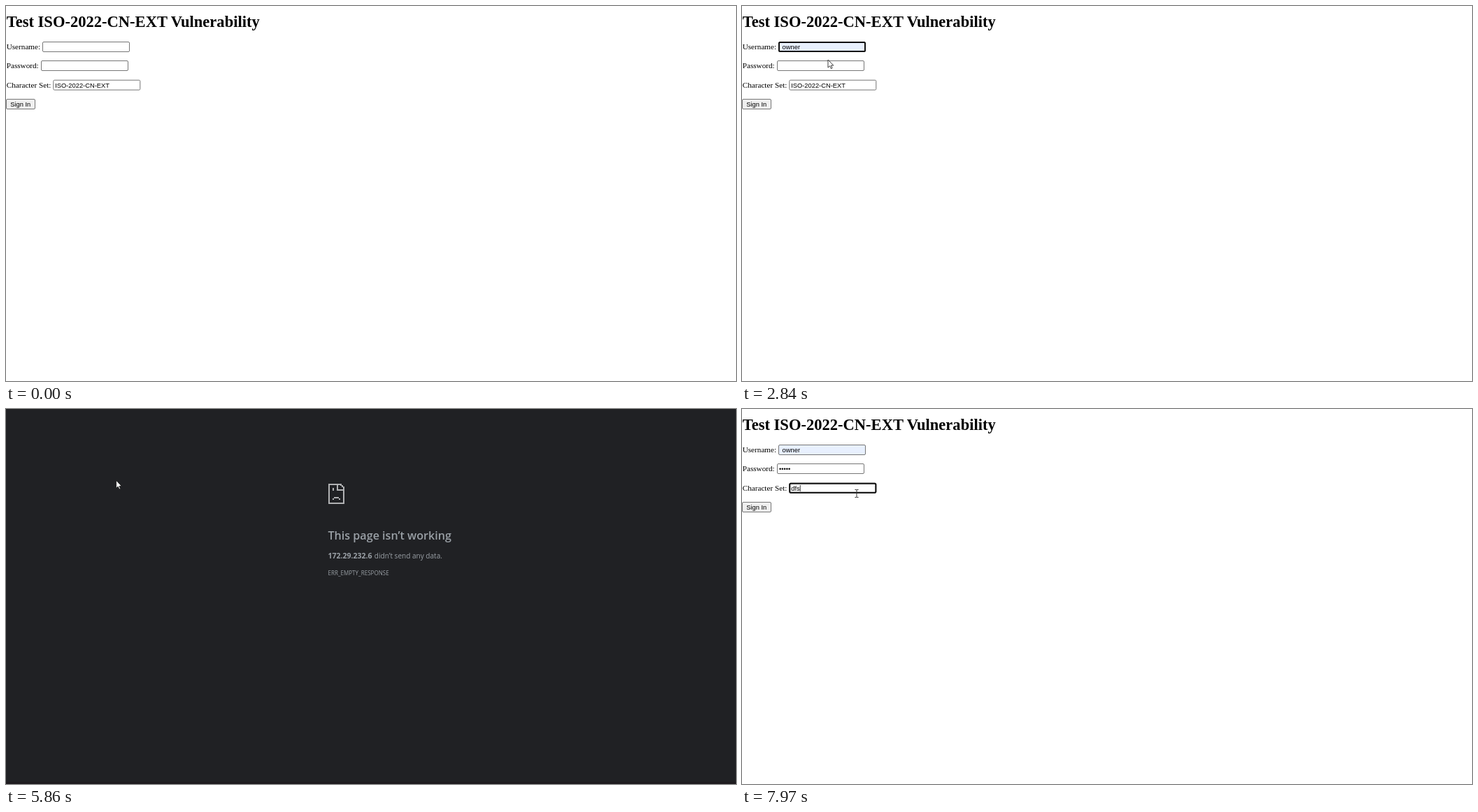
Recreate the animation shown at these times as an HTML page. Size 1044x537 px, loop 8000 ms.

```html
<!DOCTYPE html>
<html lang="en">
<head>
<meta charset="utf-8">
<title>Charset form</title>
<style>
html, body { margin: 0; width: 100%; height: 100%; overflow: hidden; background: #fff; }
svg { display: block; }
text { white-space: pre; }
#page { font: 11.2px "Liberation Serif", "Times New Roman", serif; }
.title { font-size: 22.56px; font-weight: 700; }
.ui { font: 9.33px "Liberation Sans", Arial, sans-serif; }
.field { width: 124px; height: 14px; rx: 1.5px; fill: #fff; stroke: #767676; }
#list, #error, #menu { font-family: "Open Sans", "Noto Sans", sans-serif; }
#list { font-size: 8.9px; font-weight: 600; fill: #fff; filter: drop-shadow(0 1px 1px #0004); }
#error { fill: #9aa0a6; }
#menu { font-size: 8.2px; fill: #e8eaed; }
#menu .box { filter: drop-shadow(0 3px 4px #0006); }
#menu .dim { fill: #9aa0a6; }
</style>
</head>
<body>
<svg width="1044" height="537" viewBox="0 0 1044 537">
  <g id="page">
    <text class="title" x="0.7" y="30">Test ISO-2022-CN-EXT Vulnerability</text>
    <text x="0.7" y="61.8">Username:</text>
    <text x="0.7" y="89.3">Password:</text>
    <text x="0.7" y="116.8">Character Set:</text>
    <rect class="field" x="52.5" y="51.5"/>
    <rect class="field" x="50.5" y="78.5"/>
    <rect class="field" x="67.8" y="106.2"/>
    <rect x="0.5" y="133.5" width="41" height="14" rx="1.5" fill="#efefef" stroke="#767676"/>
    <g class="ui">
      <text x="6.2" y="144">Sign In</text>
      <text id="user" x="55" y="61.5"> owner</text>
      <text id="pass" x="53" y="89"></text>
      <text id="charset" x="70.2" y="116.6"></text>
      <clipPath id="clip"><rect id="range" y="108" height="11"/></clipPath>
      <g id="selection" clip-path="url(#clip)" fill="#fff">
        <rect x="70" y="108" width="79" height="11" fill="#0078d7"/>
        <text x="70.2" y="116.6">ISO-2022-CN-EXT</text>
      </g>
    </g>
    <rect id="ring" width="123" height="13" rx="1.5" fill="none" stroke="#101010" stroke-width="2"/>
    <rect id="caret" width="0.8" height="9"/>
  </g>

  <g id="list">
    <path d="M109 72.5L115 66L121 72.5Z" fill="#28292d"/>
    <rect x="100" y="72" width="169.5" height="158" rx="2" fill="#28292d"/>
    <rect id="pick" x="100" y="75" width="169.5" height="25.4" fill="#3f4045"/>
  </g>

  <g id="error">
    <rect width="1044" height="537" fill="#202124"/>
    <rect y="534" width="1044" height="3" fill="#1e1b1f"/>
    <path fill="#b0b1b3" d="M461 107h19v2h2v2h2v25h-23zM463 109v25h19v-17h-9v-8zM475 109v6h7v-3h-2v-2h-2v-1zM467 113h2v4h-2zM469 126h7v2h-7zM467 128h2v2h-2zM476 128h2v2h-2z" fill-rule="evenodd"/>
    <text x="460.5" y="186.5" font-size="16.1" font-weight="600">This page isn’t working</text>
    <text x="460.5" y="213.8" font-size="10.5" font-weight="700">172.29.232.6</text>
    <text x="526.8" y="213.8" font-size="10.05">didn’t send any data.</text>
    <text x="460.5" y="238.3" font-size="8.05">ERR_EMPTY_RESPONSE</text>
  </g>

  <g id="menu">
    <rect class="box" x="234.5" y="125.5" width="242.5" height="179" rx="5" fill="#292a2d" stroke="#414246"/>
    <rect id="hover" x="237" y="128" width="238" height="17.5" rx="1" fill="#3f4042"/>
    <path d="M238 183.5H474M238 222.5H474M238 244.5H474M238 264.5H474" stroke="#3f4145"/>
    <path d="M249.5 232v-3h3M257 228.5h3v3M260 236v3h-3M252.5 239.5h-3v-3M252 231h2v2h-2zM256 231h2v2h-2zM252 235h2v2h-2zM256 235h2v2h-2z" fill="none" stroke="#b4b6b9" stroke-width="0.9"/>
    <circle cx="254.5" cy="255" r="5" fill="#e8552d"/>
    <path d="M464.5 252l4 3-4 3z" fill="#bdc1c6"/>
  </g>

  <circle id="click" r="9" fill="#eee600" fill-opacity="0.62"/>
  <path id="arrow" d="M0 0V11.2L2.6 8.8L4.4 12.7L6.1 11.9L4.4 8.1H7.8Z" fill="#fff" stroke="#111" stroke-width="0.8"/>
  <path id="beam" d="M-2.5 -5.5H-0.7L0 -5L0.7 -5.5H2.5M0 -5V5M-2.5 5.5H-0.7L0 5L0.7 5.5H2.5" fill="none" stroke="#333"/>
</svg>
<script>
const LOOP = 8000;
const $ = id => document.getElementById(id);
const show = (id, on) => { $(id).style.display = on ? '' : 'none'; };
const within = (t, a, b) => t >= a && t < b;
const moveTo = (id, x, y) => $(id).setAttribute('transform', `translate(${x} ${y})`);

function addText(parent, str, x, y, attrs = {}) {
  const el = document.createElementNS('http://www.w3.org/2000/svg', 'text');
  for (const [k, v] of Object.entries({ x, y, ...attrs })) el.setAttribute(k, v);
  el.textContent = str;
  $(parent).append(el);
}

['owner', 'owner%00', "<?php system($_GET['cmd']);?>", 'cedar456456', 'user', 'owner']
  .forEach((s, i) => addText('list', s, i ? 108.7 : 111, 91 + i * 25.4));

[['Back', 'Alt+Left Arrow', 140.5], ['Forward', 'Alt+Right Arrow', 158.8], ['Reload', 'Ctrl+R', 177],
 ['Save as...', 'Ctrl+S', 197.5], ['Print...', 'Ctrl+P', 215.8], ['Create QR Code for this page', '', 237],
 ['Zorel', '', 258], ['View page source', 'Ctrl+U', 278.6], ['Inspect', '', 297]]
  .forEach(([label, keys, y], i) => {
    addText('menu', label, 269, y, { class: i === 1 ? 'dim' : '' });
    addText('menu', keys, 452, y, { class: i ? 'dim' : '', 'text-anchor': 'end' });
  });

// Pointer: time, x, y
const path = [
  [130, 962, 506], [890, 125, 54], [1420, 125, 54], [1800, 122, 86], [2380, 122, 86], [2450, 123, 77],
  [2840, 123, 77], [2910, 118, 84], [3520, 118, 84], [3600, 51, 71], [5590, 51, 71], [6080, 235, 125],
  [6200, 235, 125], [6350, 255, 134], [6810, 255, 134], [6950, 205, 146], [7150, 150, 112],
  [7220, 150, 112], [7500, 50, 111], [7630, 50, 111], [7770, 164, 121], [LOOP, 164, 121]
];
const clicks = [[1010, 1160], [1990, 2120], [2980, 3120], [6080, 6210], [6480, 6610], [7200, 7630]];
const keyTimes = [3380, 3520, 4050, 4180, 4380];
const fields = [...document.querySelectorAll('.field')];
const spots = fields.map(f => [+f.getAttribute('x'), +f.getAttribute('y')]);

function pointerAt(t) {
  const i = path.findIndex(p => p[0] > t);
  if (i < 1) return path[0].slice(1);
  const [t0, x0, y0] = path[i - 1], [t1, x1, y1] = path[i];
  const u = (t - t0) / (t1 - t0), k = u * u * (3 - 2 * u);
  return [x0 + (x1 - x0) * k, y0 + (y1 - y0) * k];
}

function draw(t) {
  const [x, y] = pointerAt(t);
  const dark = within(t, 4730, 6610), listOpen = within(t, 1080, 2120);
  const over = dark || (listOpen && y > 66) ? -1
    : spots.findIndex(([fx, fy]) => x >= fx && x <= fx + 124 && y >= fy - 0.5 && y <= fy + 15);
  const focus = within(t, 1010, 2980) ? 0 : within(t, 2980, 4730) ? 1 : t >= 7200 ? 2 : -1;
  const filled = t >= 1700, dots = keyTimes.filter(k => t >= k).length;

  show('page', !dark);
  show('error', dark);
  show('list', listOpen);
  show('pick', listOpen && y > 75);
  show('menu', within(t, 6150, 6610));
  show('hover', t >= 6270);

  fields.forEach((f, i) => { f.style.stroke = i === over ? '#4f4f4f' : ''; });
  fields[0].style.fill = filled ? '#e8f0fe' : '';
  show('user', filled);
  $('pass').textContent = '•'.repeat(dots);
  $('charset').textContent = t >= 7970 ? 'dfs' : 'ISO-2022-CN-EXT';

  const selecting = within(t, 7220, 7970);
  const left = t < 7500 ? Math.min(149, Math.max(70, x)) : 70;
  show('selection', selecting);
  $('range').setAttribute('x', left);
  $('range').setAttribute('width', 149 - left);

  show('ring', focus >= 0);
  if (focus >= 0) moveTo('ring', spots[focus][0] + 0.5, spots[focus][1] + 0.5);
  show('caret', focus === 1 || (focus === 0 && !filled) || t >= 7970);
  moveTo('caret', [55, 53 + dots * 3.27, 82.8][focus] || 0, [54, 81, 109][focus] || 0);

  show('click', clicks.some(([a, b]) => within(t, a, b)));
  show('arrow', t >= 130 && over < 0);
  show('beam', t >= 130 && over >= 0);
  for (const id of ['click', 'arrow', 'beam']) moveTo(id, x, y);
}

const start = performance.now();
(function frame() {
  draw((performance.now() - start) % LOOP);
  requestAnimationFrame(frame);
})();
</script>
</body>
</html>
```
